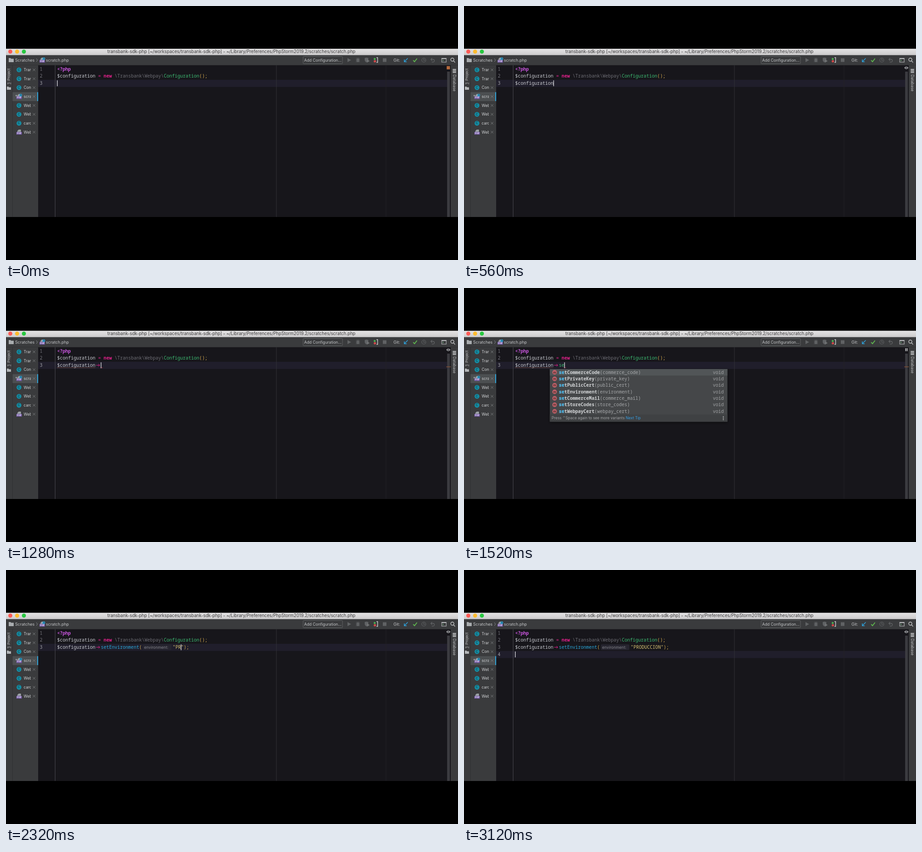
Animation, 998 px wide and 561 px high, one loop 3200 ms. Source, as an HTML page:

```html
<!DOCTYPE html>
<html lang="en">
<head>
<meta charset="utf-8">
<title>Code completion</title>
<style>
html, body { margin: 0; width: 100%; height: 100%; overflow: hidden; background: #000; }
svg { display: block; width: 998px; height: 561px; }
text { white-space: pre; font-family: Inter, Roboto, sans-serif; }
.m { font-family: "Noto Sans Mono", "DejaVu Sans Mono", monospace; font-size: 10.06px; font-variant-ligatures: none; }
</style>
</head>
<body>
<svg viewBox="0 0 998 561">
  <defs>
    <linearGradient id="bar" x2="0" y2="1"><stop stop-color="#e4e3e4"/><stop offset="1" stop-color="#cccbcc"/></linearGradient>
    <clipPath id="names"><rect x="36" y="131" width="19" height="160"/></clipPath>
    <filter id="shade" x="-5%" y="-5%" width="110%" height="115%"><feDropShadow dx="0" dy="2" stdDeviation="3" flood-opacity=".5"/></filter>
  </defs>
  <g id="frame"></g>
  <g id="live"></g>
</svg>
<script>
const LOOP = 3200, CH = 6.036, X0 = 113, HINT = 68, ROW = 14.35;
const ink = { plain: '#c8cad0', pink: '#e0218a', grey: '#6d6d74', green: '#3dbb72', blue: '#2ba9dc',
  paren: '#d3a94f', str: '#d8c373', ui: '#c3c5c7', dim: '#606264', panel: '#3a3b3d' };

const rect = (x, y, w, h, fill, more = '') => `<rect x="${x}" y="${y}" width="${w}" height="${h}" fill="${fill}" ${more}/>`;
const disc = (x, y, r, fill) => `<circle cx="${x}" cy="${y}" r="${r}" fill="${fill}"/>`;
const line = (d, stroke, w = 1, more = '') => `<path d="${d}" fill="none" stroke="${stroke}" stroke-width="${w}" ${more}/>`;
const shape = (d, fill) => `<path d="${d}" fill="${fill}"/>`;
const esc = s => s.replace(/&/g, '&amp;').replace(/</g, '&lt;');
const text = (s, x, y, size, fill, more = '') => `<text x="${x}" y="${y}" font-size="${size}" fill="${fill}" ${more}>${esc(s)}</text>`;
const mono = (s, x, y, fill, more = '') => `<text class="m" x="${x}" y="${y}" fill="${fill}" ${more}>${esc(s)}</text>`;
const base = n => 142.7 + 15.75 * (n - 1);
const colX = c => X0 + c * CH;

const folder = (x, y) => shape(`M${x} ${y}h4l1.5 1.6h5.5v7.4h-11z`, '#a9adb0');

function phpIcon(x, y, scratch) {
  return shape(`M${x - 1} ${y - 5.5}h5v10h-8v-7z`, '#9aa0a4')
    + rect(x - 6, y - .5, 12, 6, '#7057a0')
    + text('PHP', x, y + 4.3, 5, '#e2d8f2', 'text-anchor="middle" font-weight="700"')
    + (scratch ? disc(x + 3.5, y - 3, 3, '#2b9fd0') + line(`M${x + 3.5} ${y - 5}v2.2h1.8`, '#273238', .9) : '');
}

function drawFrame() {
  let o = rect(0, 94.5, 998, 371.5, ink.panel) + rect(0, 94.5, 998, 14, 'url(#bar)');
  ['#fc5b57', '#fdbc2e', '#28c840'].forEach((c, i) => o += disc(9.5 + 15 * i, 100.8, 4.5, c));
  o += text('transbank-sdk-php [~/workspaces/transbank-sdk-php] - ~/Library/Preferences/PhpStorm2019.2/scratches/scratch.php',
    497.7, 104.4, 9.66, '#3b3a3b', 'text-anchor="middle"');

  // toolbar
  o += folder(6, 115) + text('Scratches', 20, 122.8, 9.1, ink.ui) + line('M67 116l2.6 3.5l-2.6 3.5', '#8a8c8e')
    + phpIcon(80, 119.5, true) + text('scratch.php', 88, 122.8, 9.05, ink.ui)
    + rect(656, 111.5, 87, 16, 'none', 'stroke="#606264" rx="1.5"')
    + text('Add Configuration...', 699.5, 122.7, 8.7, ink.ui, 'text-anchor="middle"')
    + shape('M754 115l8 4.5l-8 4.5z', ink.dim)
    + `<ellipse cx="777" cy="120" rx="3" ry="4" fill="${ink.dim}"/>`
    + line('M772.5 117h9M772.5 120h9M772.5 123h9M775 114l1 2M779 114l-1 2', ink.dim)
    + shape('M792 115l4-1l4 1v4c0 3-2 4.500-4 5.500c-2-1-4-2.500-4-5.500z', ink.dim) + shape('M797 118l6 3.500l-6 3.500z', '#717375')
    + line('M818 114h2.500v10.500h-2.500', '#c9cbcd', 1.5) + disc(814, 117, 2.2, '#4caf50') + disc(814.5, 122, 2.6, '#cf4a4a')
    + rect(832, 115.5, 8, 8, ink.dim) + text('Git:', 855.5, 122.8, 9, ink.ui)
    + line('M887 115.500l-7 7M879.500 118v5.200h5.200', '#2f9fd6', 1.6)
    + line('M899 119.800l3 3.200l5.500-7', '#5fb84e', 1.9)
    + line('M927 119.500a4.500 4.500 0 1 1-9 0a4.500 4.500 0 1 1 9 0M922.500 116.500v3.300h2.500', ink.dim, 1.2)
    + line('M941 115l-3 3l3 3M938 118h5a2.800 2.800 0 0 1 0 5.800h-3', ink.dim, 1.3)
    + rect(962, 115.5, 10, 8.5, 'none', 'stroke="#c0c2c4"') + rect(962, 115, 10, 2, '#c0c2c4') + line('M964 118.500l2 1.600l-2 1.600', '#6cb37a')
    + line('M989 118.500a3.500 3.500 0 1 1-7 0a3.500 3.500 0 1 1 7 0M988 121l3.500 3.700', '#c0c2c4', 1.4);

  // side strips
  o += line('M0 130.500H998M14.500 131V466', '#303133')
    + text('1: Project', 0, 0, 8.2, ink.ui, 'text-anchor="middle" transform="translate(9.3 155.500) rotate(-90)"')
    + line('M10.500 173v-4', ink.ui, .7)
    + shape('M2 178h3.500l1.300 1.500h4.200v5.500h-9z', '#b4b7ba')
    + text('Database', 987, 0, 8.3, ink.ui, 'transform="translate(987 151.500) rotate(90) translate(-987 0)"');
  for (let i = 0; i < 4; i++) o += rect(986, 139 + 2.4 * i, 8, 1.7, '#b9bbbd', 'rx=".8"');

  // file list
  o += rect(14.5, 190.3, 56.5, 19.7, '#4c4f51') + rect(69, 190.3, 2, 19.7, '#2ea5dc');
  ['Trans', 'Trans', 'Config', 'scratch', 'Webpay', 'Webpay', 'card', 'Webpay'].forEach((name, i) => {
    const y = 141 + 19.65 * i;
    o += name == 'scratch' ? phpIcon(29, y, true) + text('*', 20.5, y + 3, 9, ink.ui)
      : i == 7 ? phpIcon(29, y)
      : disc(28.7, y, 5.3, '#148fa6') + text('C', 28.7, y + 2.5, 7, '#123e48', 'text-anchor="middle" font-weight="600"');
    o += text(name, 39, y + 3.1, 8.5, '#d0d2d4', 'clip-path="url(#names)"')
      + line(`M59.300 ${y - 2.7}l5.400 5.400m0-5.400l-5.400 5.400`, '#7d8082', .9);
  });

  // editor
  o += rect(71, 131, 911, 335, '#17161b') + rect(974, 145, 6, 321, '#3b3b40');
  return o;
}

const vars = ['configuration', '_SESSION', '_COOKIE', '_ENV', '_FILES', '_GET', '_POST', '_REQUEST', '_SERVER', 'argc', 'argv', 'GLOBALS']
  .map(n => [n, '', n == 'configuration' ? 'Transbank\\Webpay\\Configuration' : n == 'argc' ? 'int' : 'array']);
const setters = ['CommerceCode commerce_code', 'PrivateKey private_key', 'PublicCert public_cert', 'Environment environment',
  'CommerceMail commerce_mail', 'StoreCodes store_codes', 'WebpayCert webpay_cert'].map(s => {
    const [n, p] = s.split(' ');
    return ['set' + n, `(${p})`, 'void'];
  });
const getters = ['CommerceCode', 'PrivateKey', 'PublicCert', 'Environment', 'WebpayCert'].map(n => ['get' + n, '()', 'string']);

const lists = {
  vars: { col: 1, rows: vars },
  co: { col: 1, rows: [vars[0], vars[2]], hit: 2 },
  all: { col: 16, rows: [...setters, ...getters] },
  se: { col: 16, rows: setters, hit: 2 },
  set: { col: 16, rows: setters, hit: 3 },
  env: { col: 16, rows: [setters[3]], hit: 4 }
};

function popup({ col, rows, hit = 0 }) {
  const method = col > 1, long = rows.length > 11;
  const x = colX(col) - 20, y = 179, w = 392, bodyH = long ? 165 : rows.length * ROW, h = bodyH + 15.8;
  let o = rect(x, y, w, h, '#454749', 'filter="url(#shade)"') + rect(x, y, long ? w - 10 : w, ROW, '#515557');
  o += `<clipPath id="rows">${rect(x, y, w, bodyH, '#000')}</clipPath><g clip-path="url(#rows)">`;
  rows.forEach(([name, args, type], i) => {
    const cy = y + 7.2 + ROW * i, by = cy + 3.4, tx = x + 20;
    const bold = method ? 'font-weight="700"' : '';
    o += disc(x + 10.5, cy, 5.1, method ? '#bd5f68' : '#c58633')
      + text(method ? 'm' : '$', x + 10.5, cy + 2.5, 7, '#3b2a22', 'text-anchor="middle" font-weight="600"');
    const lead = name[0] == '_' ? 1 : 0;
    o += mono(name, tx, by, '#d3d5d7', bold);
    if (hit) o += mono(name.substr(lead, hit), tx + lead * CH, by, '#35aee6', bold);
    o += mono(args, tx + name.length * CH, by, '#a6a8aa')
      + mono(type, x + (long ? 373 : 384), by, '#a0a2a4', 'text-anchor="end"');
  });
  o += '</g>';
  if (long) o += rect(x + 384, y + 2, 6, 85, '#626567');
  const fy = y + bodyH + 11, tip = method ? 'Press ⌃Space again to see more variants' : '⌃↓ and ⌃↑ will move caret down and up in the editor';
  o += rect(x, y + bodyH, w, 15.8, '#3f4143')
    + text(tip, x + 4, fy, 8.3, '#a2a4a6') + text('Next Tip', x + (method ? 167.5 : 218.5), fy, 8.3, '#37a0e6');
  for (let i = -1; i < 2; i++) o += disc(x + 383, fy - 3 + 3.3 * i, 1, '#d0d2d4');
  return o;
}

const marks = {
  warn: rect(973, 132.7, 7.3, 7.3, '#b3693c'),
  pause: rect(974.5, 133, 1.7, 6.5, '#d4d5d7') + rect(977.6, 133, 1.7, 6.5, '#d4d5d7'),
  eye: shape('M972.300 136.500q4.400-6 8.800 0q-4.400 6-8.800 0z', '#c9cbcd') + disc(976.7, 136.5, 2.2, '#222126') + disc(976.7, 136.5, 1, '#c9cbcd'),
  error: disc(976.7, 136.3, 3.9, '#b8284a') + rect(976.1, 133.8, 1.3, 3.2, '#2a1218') + rect(976.1, 137.8, 1.3, 1.2, '#2a1218')
};

function codeLine(src, y, hint) {
  const called = src.includes('(');
  let o = '', shift = 0;
  for (const m of src.matchAll(/\$\w*|->|-|[a-zA-Z]+|"[^"]*"|[();]/g)) {
    const s = m[0], x = colX(m.index) + shift;
    if (s == '->') o += line(`M${x + 1.5} ${y - 3.6}h8M${x + 6.7} ${y - 6.2}l2.900 2.600l-2.900 2.600`, ink.pink, 1);
    else o += mono(s, x, y, s[0] == '$' ? ink.plain : s == '-' ? ink.pink : s[0] == '"' ? ink.str
      : /\w/.test(s) ? (called ? ink.blue : ink.green) : ink.paren);
    if (s == '(' && hint) {
      o += rect(x + CH + 2, y - 10, 63, 12.5, '#26252f', 'rx="2"') + text('environment:', x + CH + 5, y - .7, 8.6, '#84848b');
      shift = HINT;
    }
  }
  return o;
}

const V = '$configuration', CALL = V + '->setEnvironment(';
const typed = s => `${CALL}"${s}");`;
// time, line 3, mark, options
const steps = [
  [0, '', 'warn'],
  [80, '$', 'eye'],
  [160, '$', 'pause', { list: 'vars' }],
  [400, '$co', 'pause', { list: 'co' }],
  [480, V, 'eye'],
  [800, V, 'warn', { wave: 1 }],
  [1120, V + '-', 'eye', { wave: 1 }],
  [1200, V + '-', 'error', { wave: 1, bad: 1 }],
  [1280, V + '->', 'eye', { wave: 1, bad: 1 }],
  [1360, V + '->', 'pause', { wave: 1, bad: 1, list: 'all' }],
  [1520, V + '->se', 'pause', { wave: 1, bad: 1, list: 'se' }],
  [1600, V + '->set', 'pause', { wave: 1, bad: 1, list: 'set' }],
  [1680, V + '->setE', 'pause', { wave: 1, bad: 1, list: 'env' }],
  [1840, CALL + ');', 'eye', { caret: 31 }],
  [2080, typed(''), 'eye', { caret: 32 }],
  [2160, typed(''), 'eye', { caret: 32, hint: 1 }],
  ...['P', 'PR', 'PRO', 'PROD', 'PRODU', 'PRODUCC', 'PRODUCCI', 'PRODUCCION'].map((s, i) =>
    [2240 + 80 * i, typed(s), 'eye', { caret: 32 + s.length, hint: 1 }]),
  [2960, typed('PRODUCCION'), 'eye', { hint: 1 }],
  [3040, typed('PRODUCCION'), 'eye', { hint: 1, next: 1 }]
];

function drawStep([, src, mark, { list, wave, bad, hint, next, caret = src.length } = {}]) {
  const row = next ? 4 : 3, y3 = base(3);
  let o = rect(71, base(row) - 11.2, 903, 15.7, '#201e2b')
    + line('M108.500 131V466', '#4b4a50') + line('M597 131V466', '#333238') + line('M839 131V466', '#222127');
  for (let n = 1; n <= row; n++) o += mono(String(n), 74.5, base(n), n == row ? '#a3a3aa' : '#75757c');
  o += mono('<?php', X0, base(1), '#c755dc', 'font-weight="700"');
  [[0, V, ink.plain], [15, '=', ink.pink], [17, 'new', ink.pink, 'font-weight="800"'], [21, '\\Transbank\\Webpay\\', ink.grey],
    [39, 'Configuration', ink.green], [52, '();', ink.paren]].forEach(([c, s, f, b]) => o += mono(s, colX(c), base(2), f, b));
  o += codeLine(src, y3, hint);
  const end = colX(src.length);
  if (wave) o += line(`M${X0} ${y3 + 1.8}H${colX(14)}`, '#a8684e', 1, 'stroke-dasharray="1.600 1.400"') + rect(972, 173.6, 10, 1, '#a85f35');
  if (bad) o += line(`M${end - 1} ${y3 + 1.8}h5`, '#e0324a', 1.1, 'stroke-dasharray="1.800 1"');
  const cx = next ? X0 : colX(caret) + (hint ? HINT : 0);
  o += rect(cx - .3, base(row) - 10, 1.3, 13, '#e4e4e8') + marks[mark];
  return o + (list ? popup(lists[list]) : '');
}

document.getElementById('frame').innerHTML = drawFrame();
const live = document.getElementById('live');
const start = performance.now();
let shown = null;
function tick(now) {
  const t = Math.max(0, now - start) % LOOP;
  const step = steps.filter(s => s[0] <= t).pop();
  if (step !== shown) live.innerHTML = drawStep(shown = step);
  requestAnimationFrame(tick);
}
tick(start);
</script>
</body>
</html>
```
